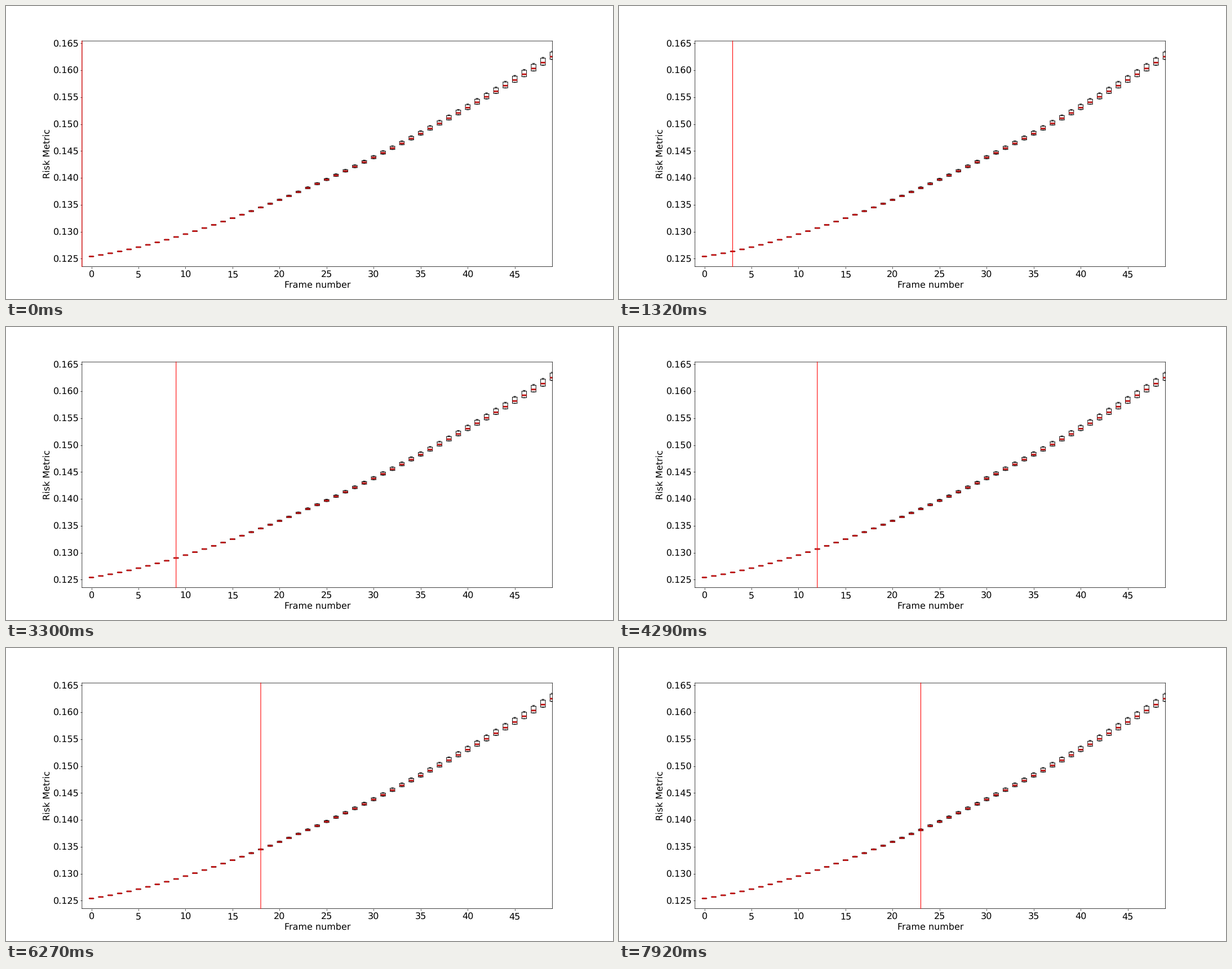
A matplotlib script for the animation above (8 s loop, 1077 by 520 pixels).

```python
import numpy as np
import matplotlib.pyplot as plt
from matplotlib.animation import FuncAnimation

W, H, DPI = 1077, 520, 64
LOOP, TICK, HOLD = 8000, 40, 330   # ms: whole loop, redraw step, cursor step
PX = 72 / DPI                      # one pixel in points
LEFT, RIGHT, TOP, BOTTOM = 134.85, 969.5, 62.1, 462.5

plt.rcParams.update({
    "font.family": "DejaVu Sans",
    "font.size": 16 * PX,
    "text.hinting": "none",
    "axes.linewidth": 0.75 * PX,
})

fig = plt.figure(figsize=(W / DPI, H / DPI), dpi=DPI, facecolor="white")
ax = fig.add_axes([LEFT / W, 1 - BOTTOM / H,
                   (RIGHT - LEFT) / W, (BOTTOM - TOP) / H])
for spine in ax.spines.values():
    spine.set_snap(False)

# Vertical scale: 0.165 sits at pixel row 66.3, 0.005 spans 47.75 pixels.
UNIT = 0.005 / 47.75


def to_value(row):
    return 0.165 - (row - 66.3) * UNIT


ax.set_xlim(-1, 49)
ax.set_ylim(to_value(BOTTOM), to_value(TOP))
ax.set_xticks(range(0, 50, 5))
ax.set_yticks(np.arange(0.125, 0.1651, 0.005))
ax.yaxis.set_major_formatter("{x:.3f}")
ax.tick_params(length=2.8 * PX, width=0.7 * PX)
ax.tick_params(axis="x", pad=4 * PX)
ax.tick_params(axis="y", pad=2.5 * PX)
ax.set_xlabel("Frame number", x=0.501, labelpad=3.2 * PX)
ax.set_ylabel("Risk Metric", labelpad=2.8 * PX)

# Median curve through a few points, spread growing with x.
knots = [0, 2, 5, 10, 15, 20, 25, 30, 35, 40, 45, 49]
rows = [444.2, 439.3, 428, 404.5, 376.5, 344.5, 308.3, 268.6, 226.3,
        180.6, 131.3, 90]
x = np.arange(50)
median = to_value(np.polyval(np.polyfit(knots, rows, 5), x))
grow = x / 49
q3 = median + 8 * grow ** 2.2 * UNIT
q1 = median - 4.5 * grow ** 1.7 * UNIT
high = median + 9.7 * grow ** 2 * UNIT
low = median - 5 * grow ** 1.6 * UNIT

ink = dict(color="black", linewidth=0.95 * PX, capstyle="projecting",
           snap=False, zorder=2)


def bars(y, half, **style):
    ax.hlines(y, x - half, x + half, **style)


for y in (q1, q3):
    bars(y, 0.25, **ink)
for y in (low, high):
    bars(y, 0.125, **ink)
for side in (-0.25, 0.25):
    ax.vlines(x + side, q1, q3, **ink)
ax.vlines(x, q3, high, **ink)
ax.vlines(x, low, q1, **ink)
bars(median, 0.25, color="#c01818", linewidth=2.9 * PX, snap=False,
     zorder=2.1)

cursor = ax.axvline(-1, color="red", linewidth=1.1 * PX, zorder=3,
                    clip_on=False, snap=False)


def update(i):
    step = (i * TICK + TICK - 1) // HOLD
    cursor.set_xdata([step - 1, step - 1])
    return [cursor]


anim = FuncAnimation(fig, update, frames=LOOP // TICK, interval=TICK,
                     repeat=True, repeat_delay=0)
plt.show()
```
